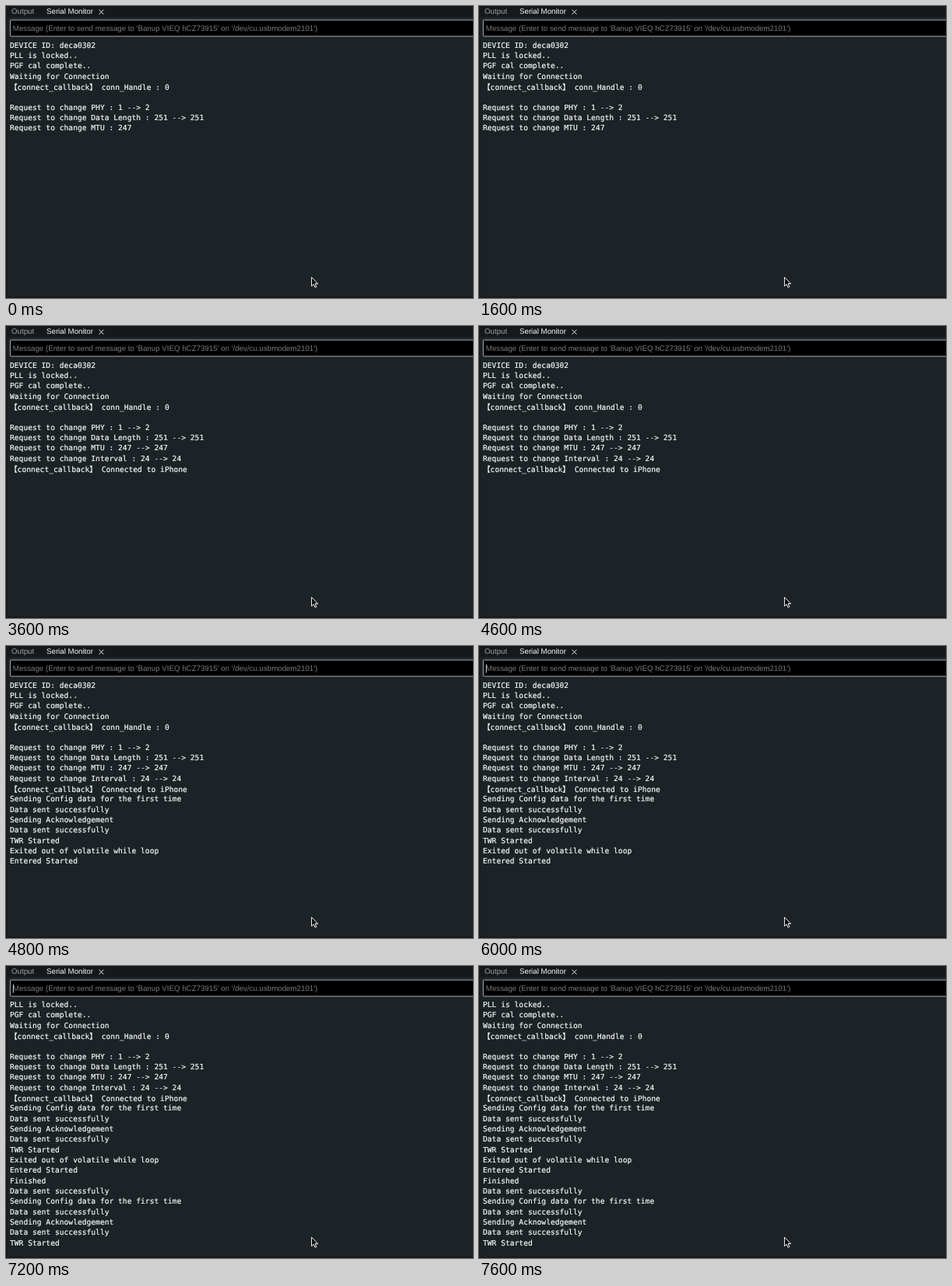
An HTML page that plays this animation: 600 px wide and 376 px high, repeating every 8000 ms.

```html
<!DOCTYPE html>
<html lang="en">
<head>
<meta charset="utf-8">
<title>Serial Monitor</title>
<style>
  html, body { margin: 0; width: 100%; height: 100%; overflow: hidden; background: #1c2225; }
  svg { display: block; }
  text { text-rendering: geometricPrecision; white-space: pre; }
  .ui { font: 9.73px "Liberation Sans", Arial, sans-serif; }
  #log {
    font: 9.65px "DejaVu Sans Mono", "Noto Sans CJK JP", "Noto Sans CJK SC", monospace;
    fill: #f4f8f8; stroke: #f4f8f8; stroke-width: .2px;
  }
</style>
</head>
<body>
<svg width="600" height="376" viewBox="0 0 600 376">
  <clipPath id="view"><rect y="42" width="600" height="332"/></clipPath>
  <rect width="600" height="376" fill="#1c2225"/>
  <path d="M0 0H600V14H0ZM0 14H1.5V376H0ZM0 374.5H600V376H0Z" fill="#15191c"/>
  <g class="ui">
    <text x="7" y="10.3" fill="#989fa1">Output</text>
    <text x="52" y="10.3" fill="#f4f8f8">Serial Monitor</text>
    <path d="M119.5 4.7l6 6m0-6l-6 6" stroke="#e6eaea"/>
    <rect x="5.4" y="18" width="600" height="21" rx="1" fill="#000" stroke="#a3afb1"/>
    <text x="8.8" y="32" fill="#777b7d">Message (Enter to send message to 'Banup VIEQ hCZ73915' on '/dev/cu.usbmodem2101')</text>
  </g>
  <rect id="caret" x="8.9" y="23.5" width=".8" height="11" fill="#fff"/>
  <g clip-path="url(#view)"><g id="log"></g></g>
  <path d="M392.6 349.3v11.4l2.6-2.4 1.8 4 1.9-.8-1.8-3.9h3.6z" fill="#000" stroke="#fff"/>
</svg>
<script>
const LOOP = 8000, PITCH = 13.325, SCROLL_AT = 7200;
const blinks = [100, 600, 1000, 1600, 2000, 2600, 3100, 3600, 4100, 4600, 5000, 5600, 6000, 6600, 7000, 7600];
const log = document.getElementById("log");
const caret = document.getElementById("caret");

const sending = ["Sending Config data for the first time", "Data sent successfully",
  "Sending Acknowledgement", "Data sent successfully", "TWR Started"];

// Lines grouped by the time they arrive
const batches = [
  [0, ["DEVICE ID: deca0302", "PLL is locked..", "PGF cal complete..", "Waiting for Connection",
    "【connect_callback】 conn_Handle : 0", "", "Request to change PHY : 1 --> 2",
    "Request to change Data Length : 251 --> 251", "Request to change MTU : 247"]],
  [1700, ["Request to change Interval : 24 --> 24", "【connect_callback】 Connected to iPhone"]],
  [4800, [...sending, "Exited out of volatile while loop", "Entered Started"]],
  [7100, ["Finished", "Data sent successfully", sending[0]]],
  [SCROLL_AT, sending.slice(1)]
];

const lines = batches.flatMap(([at, texts]) => texts.map(text => ({ at, text })));
lines.forEach((line, i) => {
  const el = document.createElementNS("http://www.w3.org/2000/svg", "text");
  el.setAttribute("x", 5);
  el.setAttribute("y", 53.75 + i * PITCH + (line.text.startsWith("【") ? 1.3 : 0));
  el.textContent = line.text;
  line.el = log.appendChild(el);
});
const mtu = lines[8];

const show = (el, on) => el.setAttribute("visibility", on ? "visible" : "hidden");

function draw(t) {
  for (const { el, at } of lines) show(el, t >= at);
  mtu.el.textContent = mtu.text + (t >= 1700 ? " --> 247" : "");
  log.setAttribute("transform", `translate(0 ${t >= SCROLL_AT ? -14 : 0})`);
  show(caret, blinks.filter(b => b <= t).length % 2);
}

let start;
function tick(now) {
  start ??= now;
  draw((now - start) % LOOP);
  requestAnimationFrame(tick);
}
draw(0);
requestAnimationFrame(tick);
</script>
</body>
</html>
```
